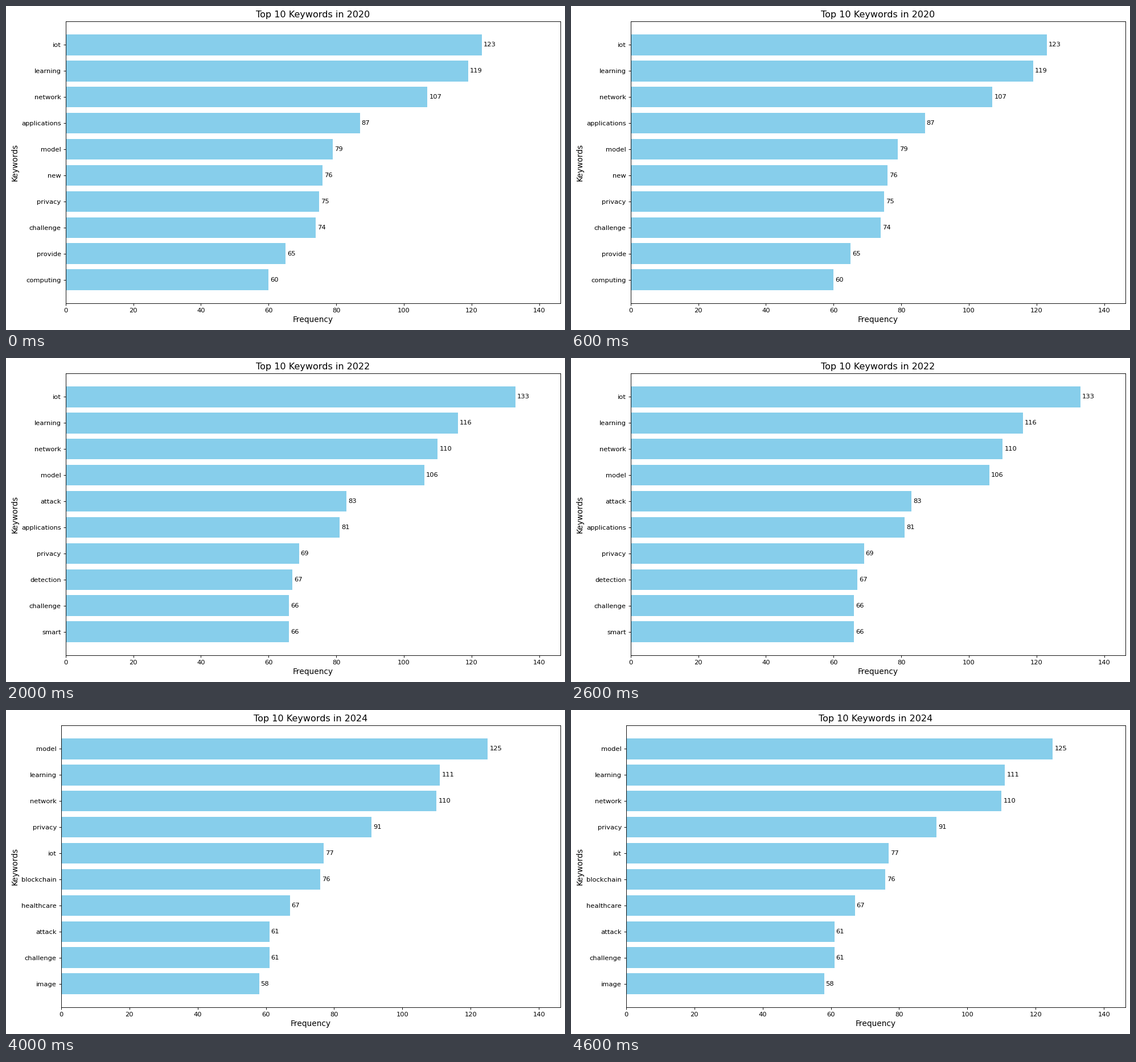
Animation, 982 px wide and 570 px high, one loop 5000 ms. Source, as a matplotlib script:

```python
import matplotlib.pyplot as plt
from matplotlib.animation import FuncAnimation

W, H, DPI = 982, 570, 82.55
BOTTOM, TOP, RIGHT = 47.3, 542.7, 974.0

YEARS = {
    2020: "iot 123, learning 119, network 107, applications 87, model 79, "
          "new 76, privacy 75, challenge 74, provide 65, computing 60",
    2021: "network 124, iot 122, learning 117, model 100, smart 83, "
          "privacy 77, blockchain 75, detection 74, challenge 70, applications 61",
    2022: "iot 133, learning 116, network 110, model 106, attack 83, "
          "applications 81, privacy 69, detection 67, challenge 66, smart 66",
    2023: "model 112, network 108, learning 98, healthcare 92, iot 85, "
          "detection 81, applications 77, challenge 77, privacy 68, blockchain 62",
    2024: "model 125, learning 111, network 110, privacy 91, iot 77, "
          "blockchain 76, healthcare 67, attack 61, challenge 61, image 58",
}


def parse(text):
    words, counts = zip(*(item.split() for item in text.split(", ")))
    return words, [int(c) for c in counts]


DATA = [(year, *parse(text)) for year, text in YEARS.items()]
X_MAX = 1.1 * max(max(counts) for _, _, counts in DATA)

plt.rcParams["font.family"] = "DejaVu Sans"
# The tiny surplus keeps the pixel size from being truncated downwards.
fig = plt.figure(figsize=((W + 1e-3) / DPI, (H + 1e-3) / DPI), dpi=DPI,
                 facecolor="white")
ax = fig.add_axes([0.1, 0.1, 0.8, 0.8])


def draw(i):
    year, words, counts = DATA[i]
    # The longest label sets the left margin.
    left = 104.7 if "applications" in words else 96.8
    ax.clear()
    ax.set_position([left / W, BOTTOM / H, (RIGHT - left) / W, (TOP - BOTTOM) / H])
    ax.barh(range(len(words)), counts, color="skyblue")
    for row, count in enumerate(counts):
        ax.text(count + 0.5, row, str(count), va="center", fontsize=10)
    ax.set_yticks(range(len(words)), words)
    ax.set_xlim(0, X_MAX)
    ax.set_ylim(9.89, -0.89)
    ax.set_xlabel("Frequency", fontsize=12)
    ax.set_ylabel("Keywords", fontsize=12)
    ax.set_title(f"Top 10 Keywords in {year}", fontsize=14)
    return []


anim = FuncAnimation(fig, draw, frames=len(DATA), interval=1000, repeat=True,
                     repeat_delay=0, blit=False)
plt.show()
```
